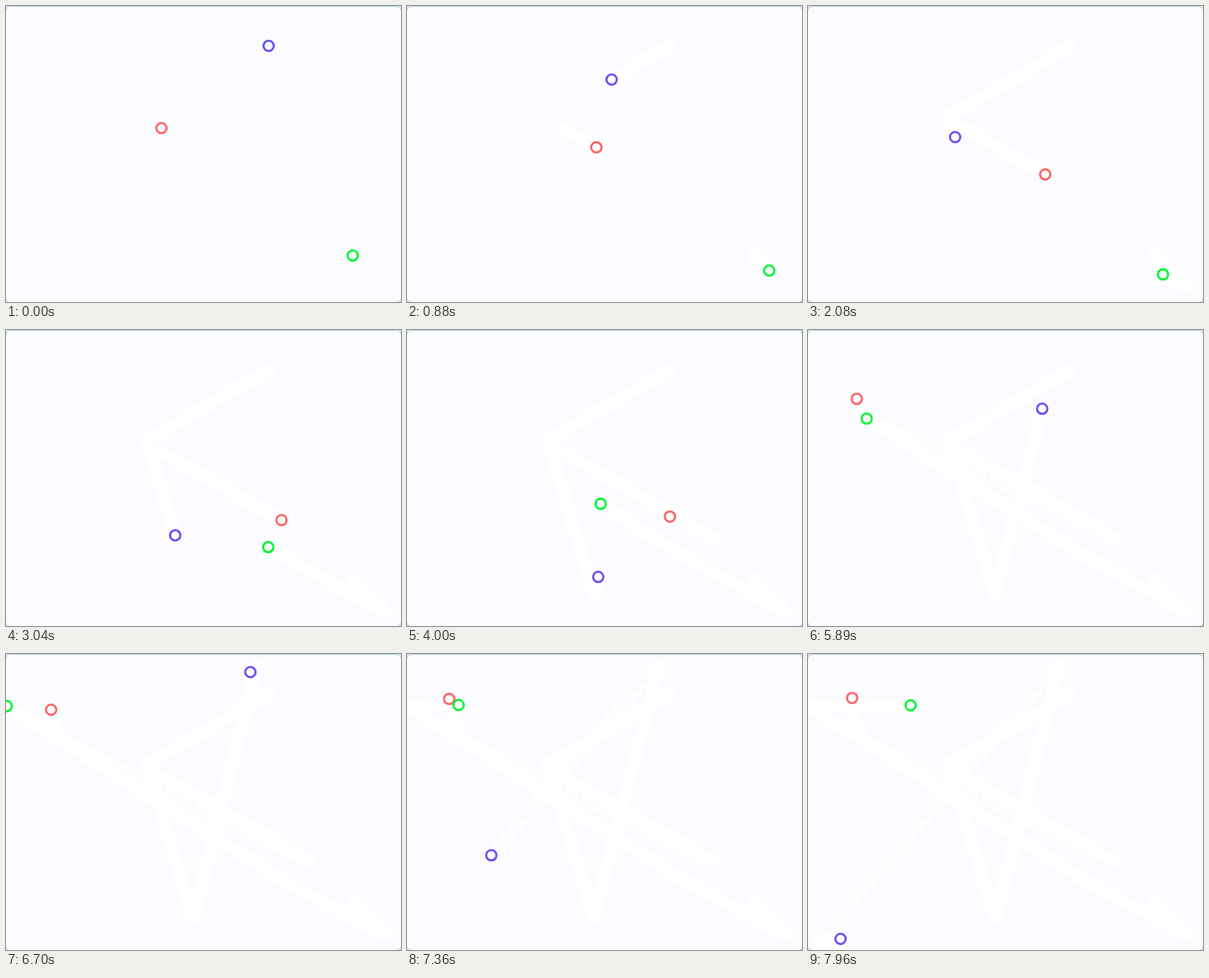
Write an HTML page with a canvas that moves like this. It is 479 px wide and 360 px high and loops after 7990 ms.

```html
<!DOCTYPE html>
<html lang="en">
<head>
<meta charset="utf-8">
<title>Gliding rings</title>
<style>
  html, body { margin: 0; width: 100%; height: 100%; overflow: hidden; background: #dce8f5; }
  canvas { display: block; }
</style>
</head>
<body>
<canvas id="stage" width="479" height="360"></canvas>
<script>
const ctx = document.getElementById('stage').getContext('2d');
const LOOP = 7.99, DEPART = 0.03, HOLD = 0.1, STAMP = 0.033;

// A ring glides at constant speed from point to point, then rests.
class Ring {
  constructor(color, x, y) {
    this.color = color;
    this.start = { x, y };
    this.glides = [];
  }

  glide(seconds, x, y) {
    this.glides.push({ seconds, x, y });
    return this;
  }

  at(time) {
    let from = this.start, elapsed = Math.max(0, time - DEPART);
    for (const to of this.glides) {
      if (elapsed < to.seconds) {
        const k = elapsed / to.seconds;
        return { x: from.x + (to.x - from.x) * k, y: from.y + (to.y - from.y) * k };
      }
      elapsed -= to.seconds;
      from = to;
    }
    return from;
  }
}

const rings = [
  new Ring('#ff6464', 188.5, 148.5)
    .glide(3.785, 371.5, 252.5).glide(1.085, 64.5, 103.5)
    .glide(2.77, 49.5, 48.5).glide(0.29, 53.5, 53.5),
  new Ring('#00f532', 420.5, 303.5)
    .glide(1.815, 460.5, 342.5).glide(0.96, 338.5, 277)
    .glide(3.93, -2, 61.5).glide(1.225, 124.5, 62.5),
  new Ring('#6650f5', 318.5, 48.5)
    .glide(1.785, 171, 134.5).glide(1.99, 226.5, 321.5)
    .glide(2.865, 305.5, 11.5).glide(1.01, 8.5, 352.5).glide(0.28, 39.5, 346.5)
];

function circle({ x, y }, color, width) {
  ctx.beginPath();
  ctx.arc(x, y, 6.25, 0, Math.PI * 2);
  ctx.strokeStyle = color;
  ctx.lineWidth = width;
  ctx.stroke();
}

function drawStage() {
  ctx.fillStyle = '#dce8f5';
  ctx.fillRect(0, 0, 479, 360);
  ctx.beginPath();
  ctx.roundRect(-0.5, 0.5, 480, 360, 6);
  ctx.fillStyle = '#fafcff';
  ctx.fill();
  ctx.strokeStyle = '#b9cfe2';
  ctx.lineWidth = 1;
  ctx.stroke();
}

function draw(time) {
  const now = time < HOLD ? 0 : time;
  drawStage();
  // Erased positions stay behind as white rings.
  for (const ring of rings) {
    for (let past = 0; past < now; past += STAMP) circle(ring.at(past), '#fff', 3.6);
  }
  for (const ring of rings) circle(ring.at(now), ring.color, 2.6);
}

const origin = performance.now();
function tick() {
  draw((performance.now() - origin) / 1000 % LOOP);
  requestAnimationFrame(tick);
}
tick();
</script>
</body>
</html>
```
